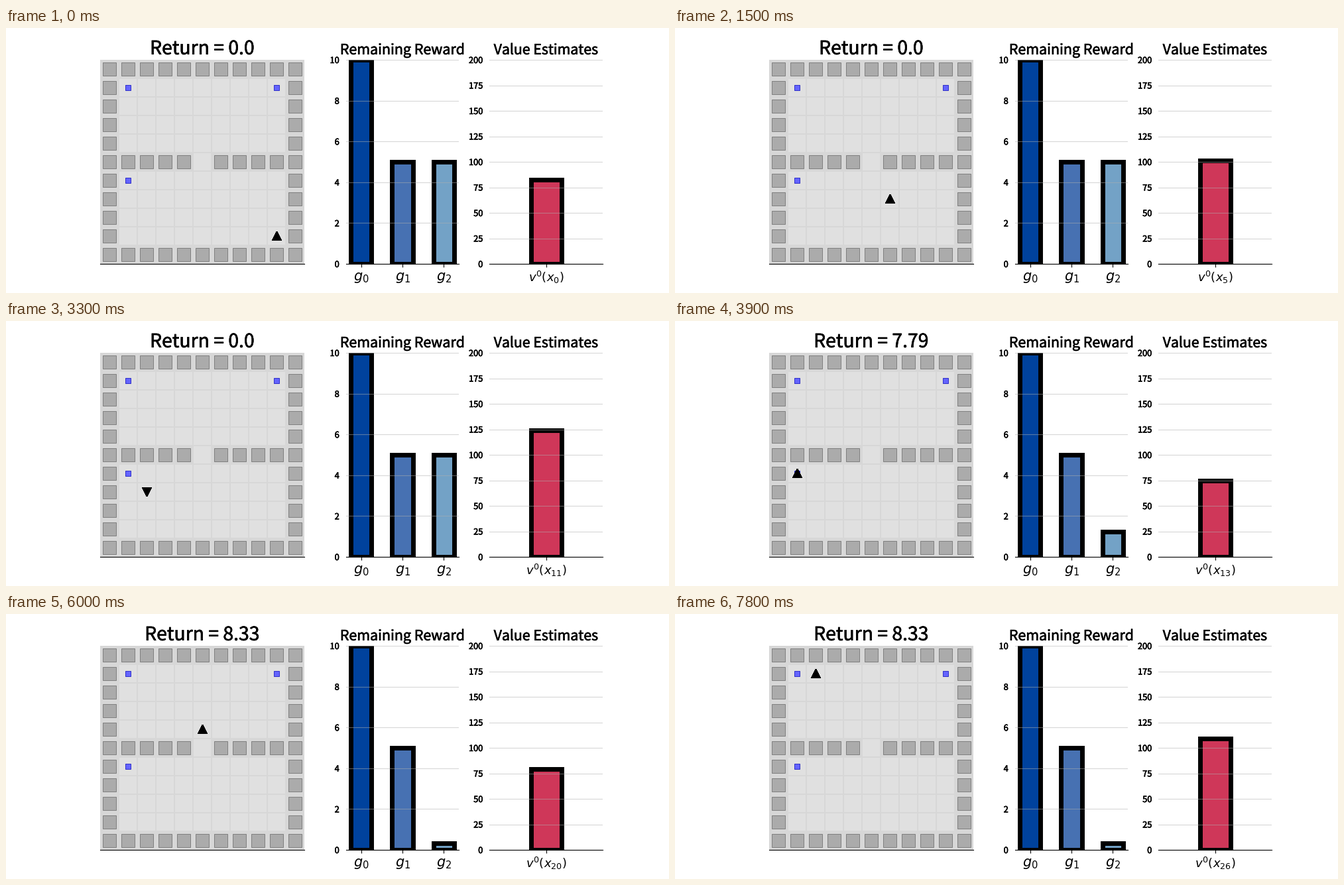
A matplotlib script for the animation above (8 s loop, 1000 by 400 pixels).

```python
import numpy as np
import matplotlib.pyplot as plt
from matplotlib.animation import FuncAnimation
from matplotlib.patches import Polygon, Rectangle
from matplotlib.patheffects import withStroke

W, H, DPI = 1000, 400, 100
FRAMES, INTERVAL, HOLD = 80, 100, 3
N = 11
CELL = 28
PIXEL = 72 / DPI
plt.rcParams["font.family"] = "Noto Sans CJK JP"
HEAVIER = [withStroke(linewidth=0.45, foreground="black")]

STEP = {"L": (-1, 0), "R": (1, 0), "U": (0, -1), "D": (0, 1)}
MOVES = "LLULU" "LULL" "LDLU" "U" "RRRR" "UUUU" "LLLU"
REWARDS = [(1, 1), (9, 1), (1, 6)]


def is_wall(c, r):
    return c in (0, N - 1) or r in (0, N - 1) or (r == 5 and c != 5)


def walk():
    c, r = 9, 9
    path = [(c, r, "U")]
    for m in MOVES:
        dc, dr = STEP[m]
        if not is_wall(c + dc, r + dr):
            c, r = c + dc, r + dr
        path.append((c, r, m))
    return path


PATH = walk()
KEY_T = [0, 5, 7, 9, 12, 13, 14, 17, 22, 26]
KEY_V = [82.5, 101.3, 103.9, 114.9, 129, 74.7, 62, 70.1, 86.4, 109.1]
VALUES = np.exp(np.interp(range(len(PATH)), KEY_T, np.log(KEY_V)))


def pickups(k):
    return int(k >= 13) + int(k >= 14)


fig = plt.figure(figsize=(W / DPI, H / DPI), dpi=DPI, facecolor="white")


def make_axes(x, width):
    ax = fig.add_axes([x / W, 44 / H, width / W, 308 / H])
    for side in ("top", "left", "right"):
        ax.spines[side].set_visible(False)
    return ax


def set_title(ax, text, size):
    return ax.set_title(text, fontsize=size, pad=6, path_effects=HEAVIER)


def chart(x, title, top, step, size):
    ax = make_axes(x, 170.96)
    set_title(ax, title, size)
    ax.set_ylim(0, top)
    ax.set_yticks(np.arange(0, top + 1, step))
    ax.tick_params(axis="y", length=0, pad=7, labelsize=9.2)
    for tick in ax.get_yticklabels():
        tick.set_path_effects(HEAVIER)
    ax.grid(axis="y", color="#b0b0b0", alpha=0.5, lw=0.8)
    return ax


def label(x, y, text, size):
    return fig.text(x / W, 1 - y / H, text, fontsize=size,
                    ha="center", va="baseline")


# Grid world
room = make_axes(142, 308)
room.set(xlim=(0, N * CELL), ylim=(N * CELL, 0), xticks=[], yticks=[],
         facecolor="#d7d7d7")
heading = set_title(room, "", 20.4)


def box(x, y, size, face, edge="none"):
    room.add_patch(Rectangle((x, y), size, size, fc=face, ec=edge,
                             lw=PIXEL, snap=False))


for c in range(N):
    for r in range(N):
        x, y = c * CELL, r * CELL
        if is_wall(c, r):
            box(x + 4.5, y + 4.5, 20, "#ababab", "#808080")
        else:
            box(x + 1, y + 1, 26, "#e0e0e0")
for c, r in REWARDS:
    box(c * CELL + 10.5, r * CELL + 38.5 - CELL, 8, "#6464ff", "#3232c8")


def stair_triangle():
    half = [(i + 1.5, -7 + 2 * i) for i in range(7)]
    right = [p for w, y in half for p in ((w, y), (w, y + 2))]
    return np.array(right + [(-w, y) for w, y in right[::-1]])


ARROW = stair_triangle()
agent = Polygon(ARROW, fc="black", ec="none", zorder=3, snap=False)
room.add_patch(agent)


def pose(c, r, way):
    dx, dy = STEP[way]
    x, y = ARROW.T
    # Local "up" (0, -1) is turned onto the heading.
    turned = np.column_stack([-dy * x - dx * y, dx * x - dy * y])
    # Half a pixel across the heading keeps the odd width on whole pixels.
    nudge = np.array([abs(dy), abs(dx)]) / 2
    return turned + nudge + ((c + 0.5) * CELL, (r + 0.5) * CELL)


# Bars
left = chart(512.5, "Remaining Reward", 10, 2, 15.4)
bars = left.bar(range(3), [10, 5, 5], 0.5, ec="black", lw=5,
                color=["#00429d", "#4771b2", "#73a2c6"])
left.set_xlim(-0.375, 2.375)
left.set_xticks(range(3), [""] * 3)
for i in range(3):
    label(536.3 + 62.17 * i, 381, f"$g_{i}$", 15)

right = chart(729.04, "Value Estimates", 200, 25, 15.3)
value_bar = right.bar([0], [VALUES[0]], 0.269, ec="black", lw=5,
                      color="#cf3759")[0]
right.set_xlim(-0.502, 0.498)
right.set_xticks([0], [""])
state = label(814.6, 383, "", 13)


def update(n):
    k = min(n // HOLD, len(PATH) - 1)
    taken = pickups(k)
    agent.set_xy(pose(*PATH[k]))
    heading.set_text("Return = " + ("0.0", "7.79", "8.33")[taken])
    bars[2].set_height(5 * 0.25 ** taken)
    value_bar.set_height(VALUES[k])
    state.set_text(f"$v^0(x_{{{k}}})$")
    return agent, heading, bars[2], value_bar, state


anim = FuncAnimation(fig, update, frames=FRAMES, interval=INTERVAL,
                     repeat=True, repeat_delay=0, blit=False)
plt.show()
```
